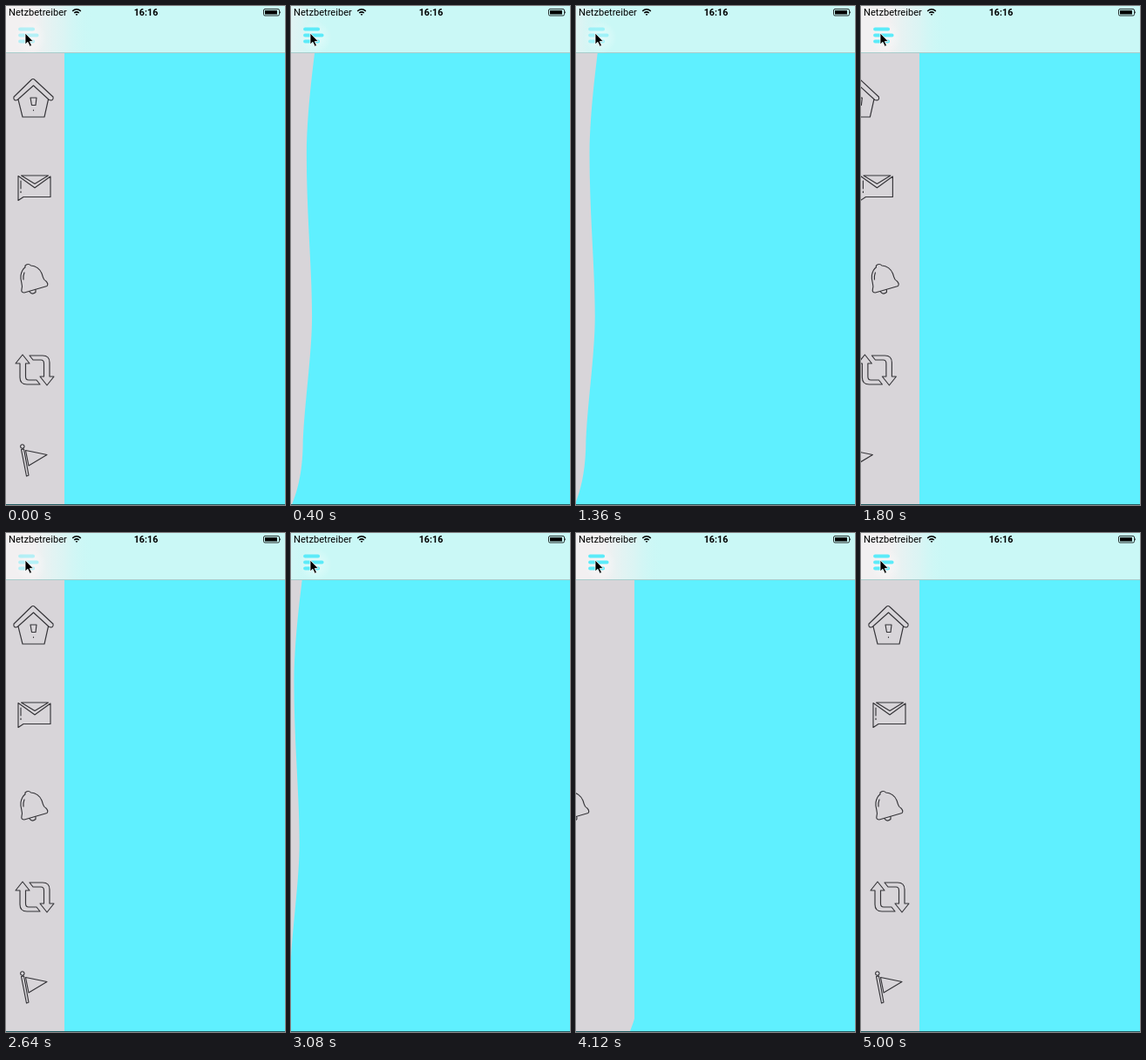
Animation, 320 px wide and 571 px high, one loop 5.04 s. Source, as an HTML page:

```html
<!DOCTYPE html>
<html lang="de">
<head>
<meta charset="utf-8">
<title>Side menu</title>
<style>
  html, body { margin: 0; height: 100%; overflow: hidden; background: #5ff0ff; }
  svg { display: block; width: 100vw; height: 100vh; }
  text { font: 11.1px Roboto, sans-serif; }
  .icon { fill: none; stroke: #353438; stroke-width: 1.15; stroke-linejoin: round; stroke-linecap: round; }
</style>
</head>
<body>
<svg viewBox="0 0 320 571">
  <defs>
    <clipPath id="panel"><rect width="67" height="571"/></clipPath>
    <linearGradient id="blur" gradientUnits="userSpaceOnUse" x1="-34" x2="34" y1="0" y2="0">
      <stop stop-color="#f2f0f1"/>
      <stop offset=".5" stop-color="#e0f3f3" stop-opacity=".75"/>
      <stop offset="1" stop-color="#caf8f6" stop-opacity="0"/>
    </linearGradient>
    <radialGradient id="glow">
      <stop stop-color="#fff" stop-opacity=".5"/>
      <stop offset="1" stop-color="#fff" stop-opacity="0"/>
    </radialGradient>
  </defs>

  <rect width="320" height="571" fill="#5ff0ff"/>
  <g clip-path="url(#panel)">
    <path id="sheet" fill="#d8d5d9" d="M-150 0H34C30 40 18.5 110 18.3 170C18.3 240 24.5 300 24.5 355C24.5 400 15 460 14 505C13 540 6 560 0 574H-150Z"/>
    <g class="icon">
      <path d="M14 107 19 127H44L48.5 107M13 107.5Q8 109 9 104L29 84.500Q31 82.500 33 84.500L54 104Q55 109 49.500 107.500L31.500 91Z M28 105H35L34 113.500H29.500Z M31.500 119v.6"/>
      <path d="M14 194.500V222.500L20 218.500H51V195L33 208ZM17.500 194H48.500L33 203.500ZM17 200v9M17 212v1.500"/>
      <path d="M22 299C21 296 26 294 28.500 297C34 297 39 301 41 306C43 311 42 313 46 315Q49 318 47 320.500L21 328Q17 328 18 324C20 319 16 315 17 308C18 303 19 301 22 299M27 327Q30 331 34 327.500V325M21 305Q19.500 309 20 313"/>
      <path d="M19 399 27 409H22.500V424Q22.500 428 26 428H35L39 433H24Q16 433 16 425V409H11ZM47 434 39 424H43.500V409Q43.500 405 40 405H31L27 400H42Q50 400 50 408V424H55Z"/>
      <path d="M17.500 507.500 20.500 507 26 537 23.500 538ZM22.500 508.500 47 513.500 26 526ZM21 504a2.200 2.200 0 1 0-4.400 0a2.200 2.200 0 1 0 4.400 0"/>
    </g>
  </g>

  <rect width="320" height="53" fill="#caf8f6"/>
  <rect id="tint" width="320" height="53" fill="url(#blur)"/>
  <rect y="53" width="320" height="1" fill="#a8cccb"/>
  <rect y="570" width="320" height="1" fill="#255d63"/>

  <text x="3" y="11">Netzbetreiber</text>
  <text x="160.500" y="11" text-anchor="middle" style="font-weight:bold;font-size:10.700px">16:16</text>
  <g fill="none" stroke="#000" stroke-width="1.500">
    <path d="M76.200 5.800Q81 1.800 85.800 5.800M78.200 8Q81 5.700 83.800 8"/>
    <path d="M79.600 9.500Q81 8.300 82.400 9.500L81 11Z" fill="#000" stroke="none"/>
    <rect x="295.500" y="3.500" width="18" height="7.500" rx="1.500" stroke-width=".8"/>
    <path d="M297 5H311V9.600H297ZM314.300 5.800Q316 7.200 314.300 8.800Z" fill="#000" stroke="none"/>
  </g>

  <circle cx="28" cy="36" r="19" fill="url(#glow)"/>
  <path id="button" d="M16.200 26.500H31M16.200 33.500H35.500M16.200 40.500H31" stroke="#5cebf9" stroke-width="4.200" stroke-linecap="round"/>
  <path d="M22 31V44L25 41.300 27.300 46.300 29.500 45.300 27.300 40.600H31.300Z" stroke="#fff" stroke-width=".8"/>
</svg>
<script>
const LOOP = 5040, HIDDEN = -36, SHOWN = 70, ICON_SHIFT = -60;
const presses = [
  { at: 0, opens: false },
  { at: 1108, opens: true },
  { at: 2640, opens: false },
  { at: 3606, opens: true }
];
const $ = id => document.getElementById(id);
const icons = document.querySelectorAll('.icon path');
const progress = (t, start, length) => Math.min(1, Math.max(0, (t - start) / length));
const mix = (a, b, p) => a + (b - a) * p;
const smooth = p => p * p * (3 - 2 * p);
const shift = (el, x) => el.setAttribute('transform', `translate(${x})`);

function draw(now) {
  const time = now % LOOP;
  const { at, opens } = presses.findLast(p => p.at <= time);
  const t = time - at;

  const slide = opens
    ? mix(HIDDEN, SHOWN, progress(t, 115, 440))
    : mix(SHOWN, HIDDEN, progress(t, 205, 295));
  shift($('sheet'), slide);

  // Icons travel from the middle outwards.
  icons.forEach((icon, i) => {
    const rank = Math.abs(i - 2);
    const away = opens
      ? (1 - progress(t, 434 + 90 * rank, 450)) ** 3
      : progress(t, 40 + 20 * rank, 200) ** 2;
    shift(icon, ICON_SHIFT * away);
  });

  const topWidth = Math.min(67, Math.max(0, slide + 30));
  $('blur').setAttribute('gradientTransform', `translate(${topWidth * 1.5 - 34})`);

  const fade = opens ? progress(t, 210, 240) : progress(t, 100, 250);
  $('button').setAttribute('opacity', mix(.42, 1, smooth(fade)));
}

const begin = performance.now();
(function tick() {
  draw(performance.now() - begin);
  requestAnimationFrame(tick);
})();
</script>
</body>
</html>
```
